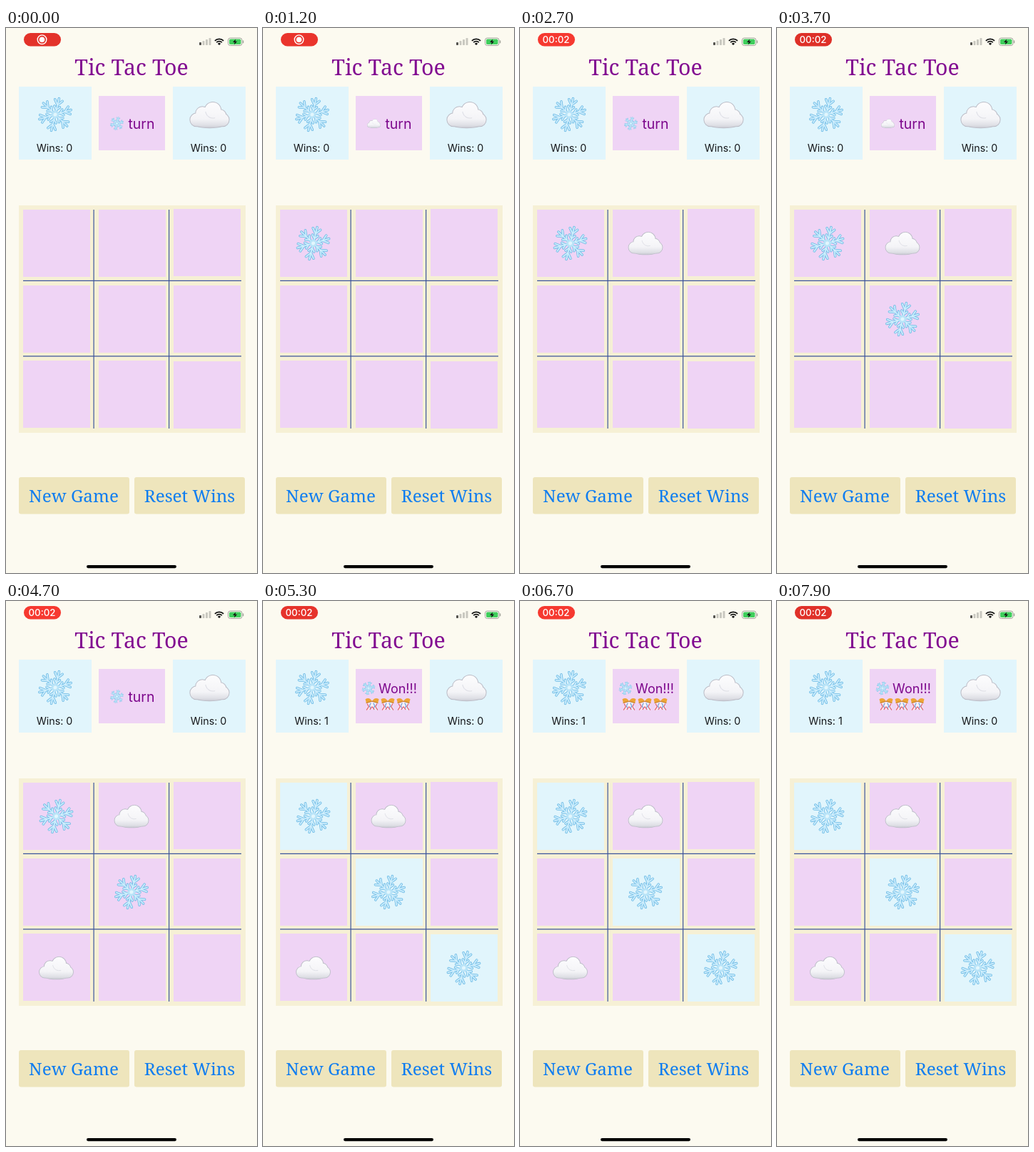
An HTML page with a canvas that plays this animation: 352 px wide and 762 px high, repeating every 8000 ms.

```html
<!DOCTYPE html>
<html lang="en">
<head>
<meta charset="utf-8">
<title>Tic Tac Toe</title>
<style>
html, body { margin: 0; width: 100%; height: 100%; overflow: hidden; background: #fcfaf0; }
canvas { display: block; }
</style>
</head>
<body>
<canvas id="stage" width="352" height="762"></canvas>
<script>
const ctx = document.getElementById('stage').getContext('2d');
const LOOP = 8000, TAU = Math.PI * 2;
const SERIF = '"Noto Serif", serif', SANS = 'Inter, sans-serif';
const PAPER = '#fcfaf0', ICE = '#e1f5fc', PINK = '#efd4f5', PURPLE = '#7d078c';
const MOVES = [
  { at: 900, cell: 0 }, { at: 2000, cell: 1 }, { at: 3100, cell: 4 },
  { at: 4100, cell: 6 }, { at: 5100, cell: 8 }
];
const WIN_AT = 5100, TIMER_AT = 2000;

function box(x, y, w, h, color, r = 0) {
  ctx.fillStyle = color;
  ctx.beginPath();
  ctx.roundRect(x, y, w, h, r);
  ctx.fill();
}

function dot(x, y, r, color) {
  ctx.fillStyle = color;
  ctx.beginPath();
  ctx.arc(x, y, r, 0, TAU);
  ctx.fill();
}

function line(color, width, ...pts) {
  ctx.strokeStyle = color;
  ctx.lineWidth = width;
  ctx.beginPath();
  for (let i = 0; i < pts.length; i += 2) ctx.lineTo(pts[i], pts[i + 1]);
  ctx.stroke();
}

function label(text, x, y, size, color, family = SANS, weight = 400) {
  ctx.font = `${weight} ${size}px ${family}`;
  ctx.textAlign = 'center';
  ctx.fillStyle = color;
  ctx.fillText(text, x, y);
}

function at(x, y, scale, draw) {
  ctx.save();
  ctx.translate(x, y);
  ctx.scale(scale, scale);
  ctx.lineCap = ctx.lineJoin = 'round';
  draw();
  ctx.restore();
}

// About 52 units across
function flake() {
  ctx.rotate(0.24);
  for (const [color, width] of [['#62b3e0', 3.6], ['#a9ddf7', 2.5], ['#dcf3fd', 0.9]]) {
    for (let i = 0; i < 6; i++) {
      line(color, width, 0, 0, 0, -23.5);
      line(color, width, -5.5, -21, 0, -14, 5.5, -21);
      line(color, width, -4, -11.5, 0, -7, 4, -11.5);
      ctx.rotate(TAU / 6);
    }
  }
  dot(0, 0, 5.5, '#b9e4f8');
  dot(0, 0, 2.6, '#e2f6fd');
}

// About 50 by 33 units
function cloud() {
  const puffs = [[-16, 6, 8.5], [16, 6, 8.5], [-9, -2, 8.5], [4, -5.5, 10.5], [13, 1, 8]];
  const shape = grow => {
    ctx.beginPath();
    for (const [x, y, r] of puffs) {
      ctx.moveTo(x + r + grow, y);
      ctx.arc(x, y, r + grow, 0, TAU);
    }
    ctx.moveTo(24 + grow, 8);
    ctx.ellipse(0, 8, 24 + grow, 8.3 + grow, 0, 0, TAU);
    ctx.fill();
  };
  ctx.fillStyle = '#bcbdc7';
  shape(0.4);
  const shade = ctx.createLinearGradient(0, -17, 0, 17);
  shade.addColorStop(0, '#fdfdfe');
  shade.addColorStop(0.65, '#f4f4f7');
  shade.addColorStop(0.88, '#dedfe5');
  shade.addColorStop(1, '#c3c4cd');
  ctx.fillStyle = shade;
  shape(-0.5);
  ctx.strokeStyle = '#dcdde4';
  ctx.lineWidth = 0.9;
  ctx.beginPath();
  ctx.arc(4, -5, 9, 1.3, 3);
  ctx.stroke();
}

// About 20 by 20 units
function confetti() {
  line('#f6e3ec', 5, -4, 0, -6, 7);
  line('#e8ecf8', 5, 4, 0, 6, 7);
  line('#f8f1f5', 4, 0, -1, 0, 6);
  for (const side of [-1, 1]) {
    line('#e2566b', 1.2, side * 7, 0, side * 5, 4, side * 8, 8.5);
    line('#6f9fdb', 1.2, side * 2, -1, side * 4, 3, side * 2, 6);
    ctx.fillStyle = '#eda536';
    ctx.beginPath();
    ctx.moveTo(0, -4);
    ctx.quadraticCurveTo(side * 4, -11, side * 10, -7);
    ctx.lineTo(side * 8.5, -1);
    ctx.closePath();
    ctx.fill();
    line('#b97520', 0.9, 0, -4, side * 8.5, -1.5);
  }
  line('#e2566b', 1.1, -3, 8, 0, 4, 3, 8);
}

const mark = (i, x, y, scale) => at(x, y, scale, i % 2 ? cloud : flake);

function statusBar(t) {
  const glow = (1 - Math.cos((t - 3700) / 2000 * TAU)) / 2;
  const mix = (a, b) => Math.round(a + (b - a) * glow);
  box(25, 7, 52, 18.5, `rgb(${mix(222, 246)},${mix(48, 57)},${mix(40, 48)})`, 9.2);
  if (t < TIMER_AT) {
    ctx.strokeStyle = '#fff';
    ctx.lineWidth = 1.4;
    ctx.beginPath();
    ctx.arc(50.5, 16.2, 6.3, 0, TAU);
    ctx.stroke();
    dot(50.5, 16.2, 3.8, '#fff');
  } else {
    label('00:02', 50.5, 21, 13.3, '#fff', SANS, 500);
  }

  for (let i = 0; i < 4; i++) {
    const h = 4 + i * 2;
    box(271 + i * 4.5, 24 - h, 3, h, i ? '#c9c8c0' : '#55544f', 0.8);
  }

  ctx.strokeStyle = '#111';
  ctx.lineWidth = 1.9;
  for (const r of [8.6, 5.4]) {
    ctx.beginPath();
    ctx.arc(299, 24, r, -Math.PI * 0.75, -Math.PI * 0.25);
    ctx.stroke();
  }
  ctx.fillStyle = '#111';
  ctx.beginPath();
  ctx.moveTo(299, 24);
  ctx.arc(299, 24, 3, -Math.PI * 0.75, -Math.PI * 0.25);
  ctx.fill();

  ctx.strokeStyle = '#a3a49c';
  ctx.lineWidth = 1;
  ctx.beginPath();
  ctx.roundRect(311.5, 14, 19.5, 10.5, 3);
  ctx.stroke();
  box(313, 15.5, 16.5, 7.5, '#3fce5c', 1.8);
  box(332, 17.3, 1.3, 4, '#a3a49c', 0.6);
  ctx.fillStyle = '#111';
  ctx.beginPath();
  for (const [x, y] of [[322.3, 15.5], [318, 20], [320.8, 20], [319.8, 23.5], [324.2, 18.8], [321.5, 18.8]])
    ctx.lineTo(x, y);
  ctx.fill();
}

function header(turn, won) {
  label('Tic Tac Toe', 176, 66.3, 30.3, '#820b91', SERIF);
  box(18, 82, 102, 102, ICE);
  box(234, 82, 102, 102, ICE);
  mark(0, 69, 121, 0.98);
  mark(1, 285.5, 121.5, 1.13);
  label(`Wins: ${won ? 1 : 0}`, 68, 173.3, 14.3, '#15171a');
  label('Wins: 0', 284, 173.3, 14.3, '#15171a');

  box(130, 95, 93, 76, PINK);
  if (won) {
    mark(0, 148, 122, 0.38);
    label('Won!!!', 189, 128.5, 18, PURPLE);
    for (let i = 0; i < 3; i++) at(153 + i * 22, 144, 0.95, confetti);
  } else {
    mark(turn, 155.5, 133.5, 0.38);
    label('turn', 190, 140.5, 19.5, PURPLE);
  }
}

function board(t, won) {
  box(18, 248, 318, 318, '#f6f0d5');
  for (let i = 0; i < 9; i++) {
    const col = i % 3, row = Math.floor(i / 3);
    const y = [254, 360, 465][row] + (col < 2 ? 0 : [-1, 0, 1][row]);
    box([24, 130, 235][col], y, 94, 94, won && i % 4 === 0 ? ICE : PINK);
  }
  const ink = '#3c559c';
  for (const p of [0, 105.5]) {
    box(122.5 + p, 254, 1.2, 306, ink);
    box(24, 352.7 + p, 306, 1.2, ink);
  }
  MOVES.forEach(({ at: start, cell }, i) => {
    if (t >= start) mark(i, 70.5 + cell % 3 * 105.5, 301 + Math.floor(cell / 3) * 106, 0.98);
  });
}

function draw(t) {
  const won = t >= WIN_AT;
  const turn = MOVES.filter(m => t >= m.at).length;
  box(0, 0, 352, 762, PAPER);
  statusBar(t);
  header(turn, won);
  board(t, won);
  box(18, 628, 155, 51.5, '#eee5bc', 3);
  box(180, 628, 155, 51.5, '#eee5bc', 3);
  label('New Game', 95, 662.5, 24.3, '#0f7df0', SERIF);
  label('Reset Wins', 257.5, 662.5, 24.3, '#0f7df0', SERIF);
  box(113, 751, 126, 4.2, '#000', 2.1);
}

function tick() {
  draw(performance.now() % LOOP);
  requestAnimationFrame(tick);
}
tick();
</script>
</body>
</html>
```
